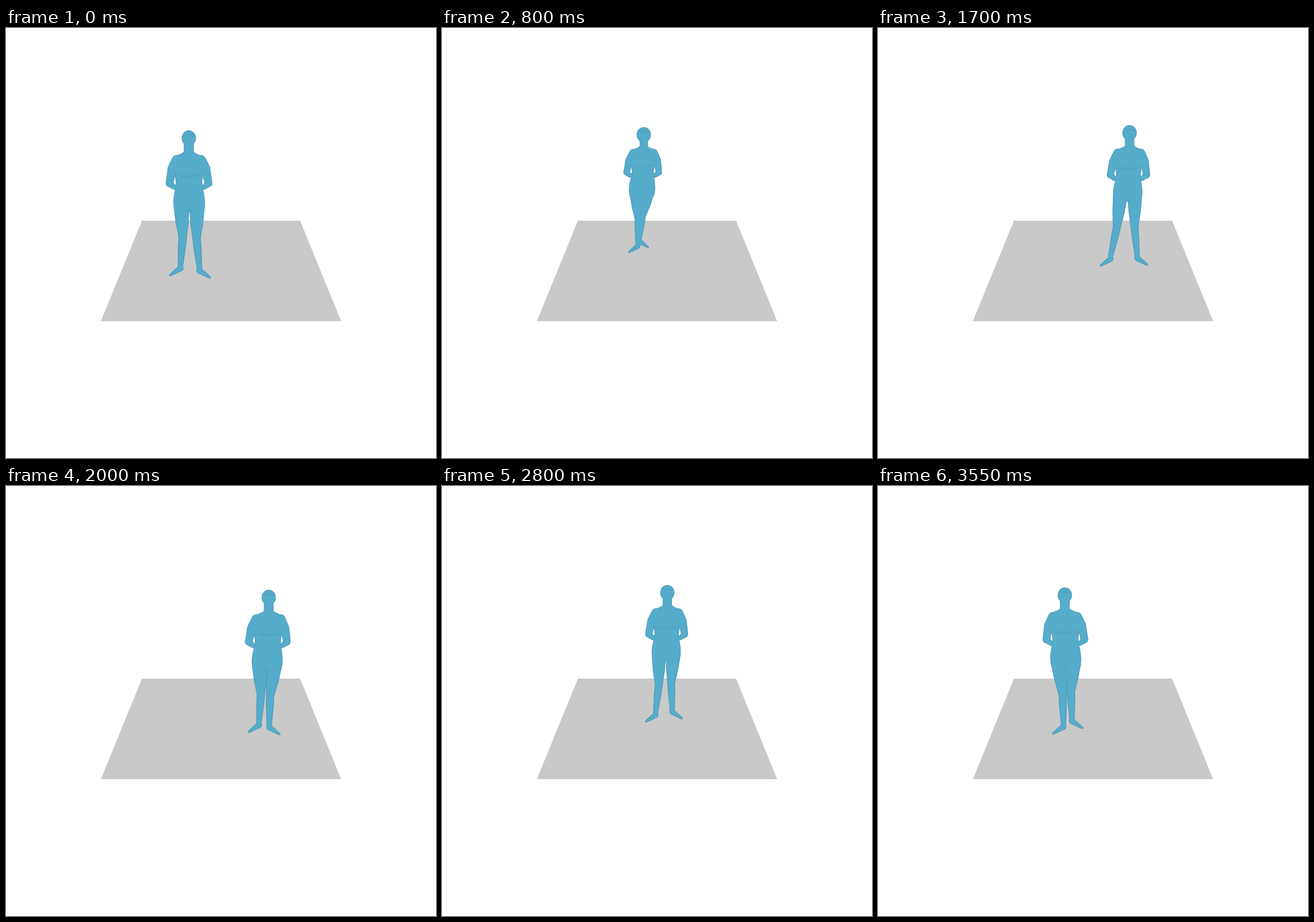
These frames come from a looping animation (748 by 748 pixels, 3.6 s). An HTML page with a canvas:

```html
<!DOCTYPE html>
<html lang="en">
<head>
<meta charset="utf-8">
<title>Dancing figure</title>
<style>
html, body { margin: 0; height: 100%; overflow: hidden; background: #fff; }
canvas { display: block; }
</style>
</head>
<body>
<canvas width="748" height="748"></canvas>
<script>
const ctx = document.querySelector('canvas').getContext('2d');
const LOOP = 3600, STEP = 50;
const EDGE = '#4795b4', SKIN = '#56accb';

// Dance steps: base of the neck, body size, distance between the ankles,
// their shift from the neck, and how far the left foot is in front.
const dance = [
  { t: 0,    x: 318, y: 217, size: 1,   gap: 33, shift: 2,   front: -2 },
  { t: 220,  x: 306, y: 215, size: .98, gap: 42, shift: 0,   front: 0 },
  { t: 800,  x: 351, y: 207, size: .83, gap: 3,  shift: -9,  front: 5 },
  { t: 1350, x: 415, y: 205, size: .87, gap: 10, shift: -12, front: 4 },
  { t: 2000, x: 457, y: 219, size: .98, gap: 18, shift: -8,  front: -2 },
  { t: 2450, x: 428, y: 213, size: .95, gap: -1, shift: 9,   front: 6 },
  { t: 2800, x: 392, y: 209, size: .92, gap: 29, shift: -6,  front: 3 },
  { t: 3550, x: 325, y: 215, size: .98, gap: 15, shift: 5,   front: 5 }
];

const mix = (a, b, k) => a + (b - a) * k;
const between = (a, b, k) => a.map((v, i) => mix(v, b[i], k));

// Between two steps the body rises and the feet open; longer steps do more.
function poseAt(t) {
  const i = dance.findLastIndex((step, n) => step.t <= t && n < dance.length - 1);
  const from = dance[i], to = dance[i + 1];
  const span = to.t - from.t, k = (t - from.t) / span;
  const pose = {};
  for (const key in from) pose[key] = mix(from[key], to[key], k);
  const swing = Math.sin(Math.PI * k) ** 2;
  pose.lift = 0.01 * span * swing;
  pose.gap += 0.05 * span * swing;
  return pose;
}

// A chain of tapered segments; each node is [x, y, radius].
function limb(nodes, inset) {
  ctx.beginPath();
  for (let n = 1; n < nodes.length; n++) {
    for (let k = 0; k <= 1; k += 1 / 24) {
      const [x, y, r] = between(nodes[n - 1], nodes[n], k);
      ctx.moveTo(x + r, y);
      ctx.arc(x, y, Math.max(0.3, r - inset), 0, 7);
    }
  }
  ctx.fill();
}

function halfTorso(inset) {
  const x = v => v - inset;
  ctx.beginPath();
  ctx.moveTo(-1, -4);
  ctx.lineTo(x(8), -4);
  ctx.bezierCurveTo(x(9), 3, x(20), 1, x(25), 9);
  ctx.bezierCurveTo(x(26), 28, x(24), 40, x(23), 52);
  ctx.bezierCurveTo(x(23), 62, x(27), 72, x(27.5), 86);
  ctx.lineTo(x(26), 102);
  ctx.quadraticCurveTo(x(14), 108, -1, 103);
  ctx.fill();
}

function figure({ x, y, size, gap, shift, front, lift }) {
  const neck = [x, y - lift];
  const lean = 0.4 * shift / 105;
  const at = (u, v) => [neck[0] + u * size + v * lean, neck[1] + v * size];
  const node = (point, r) => [...point, r * size];
  const inTorso = (side, draw) => {
    ctx.save();
    ctx.transform(side * size, 0, lean, size, ...neck);
    draw();
    ctx.restore();
  };
  const head = [neck[0], neck[1] - 25.5 * size];

  for (const [color, inset] of [[EDGE, 0], [SKIN, 1]]) {
    ctx.fillStyle = color;
    for (const side of [-1, 1]) {
      limb([
        node(at(side * 21, 13), 9), node(at(side * 29, 28), 8.2),
        node(at(side * 34, 53), 6.6), node(at(side * 26, 60), 4.2)
      ], inset);

      const hip = at(side * 13.5, 91);
      const ankle = [x + shift + side * gap / 2, y + (198 - side * front) * size];
      const knee = between(hip, ankle, 0.53);
      knee[0] -= side * 3 * size;
      const heel = [ankle[0], ankle[1] + 5 * size];
      const toe = [ankle[0] + side * 18 * size, ankle[1] + 17 * size];
      limb([
        node(hip, 13.7), node(between(hip, knee, 0.5), 11.5), node(knee, 7.3),
        node(between(knee, ankle, 0.35), 7), node(ankle, 4.7),
        node(heel, 5.3), node(toe, 2)
      ], inset);
      inTorso(side, () => halfTorso(inset));
    }
    limb([node(head, 9), node(neck, 8.5)], inset);
    ctx.beginPath();
    ctx.ellipse(...head, 12.4 - inset, 13.4 - inset, 0, 0, 7);
    ctx.fill();
  }

  // Soft shading on the brow, chest and hips.
  ctx.strokeStyle = 'rgba(40, 110, 145, .09)';
  ctx.lineWidth = 5;
  inTorso(1, () => {
    ctx.beginPath();
    ctx.moveTo(-18, 39);
    ctx.quadraticCurveTo(0, 44, 18, 39);
    ctx.moveTo(-6, 101);
    ctx.lineTo(6, 101);
    ctx.stroke();
  });
  ctx.beginPath();
  ctx.ellipse(head[0], head[1] - 2, 8, 4, 0, 3.4, 6);
  ctx.stroke();
}

function frame(now) {
  const t = Math.floor(now / STEP) * STEP % LOOP;
  ctx.fillStyle = '#fff';
  ctx.fillRect(0, 0, 748, 748);
  ctx.fillStyle = '#c9c9c9';
  ctx.beginPath();
  ctx.moveTo(236.5, 335);
  ctx.lineTo(511.5, 335);
  ctx.lineTo(583, 510);
  ctx.lineTo(165, 510);
  ctx.fill();
  figure(poseAt(t));
  requestAnimationFrame(frame);
}
requestAnimationFrame(frame);
</script>
</body>
</html>
```
